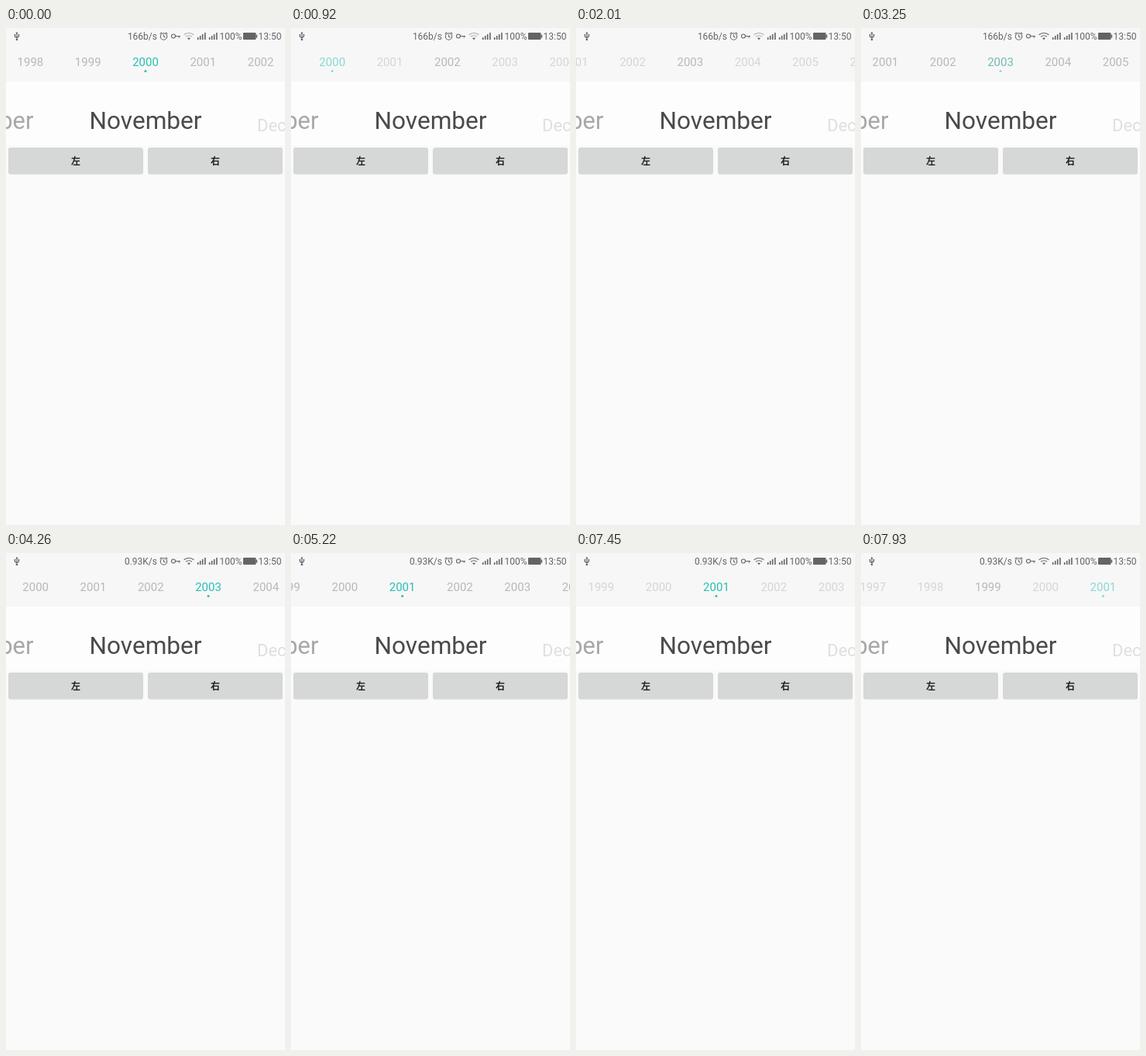
Animation, 360 px wide and 640 px high, one loop 8 s. Source, as an HTML page:

```html
<!DOCTYPE html>
<html lang="en">
<head>
<meta charset="utf-8">
<title>Year picker</title>
<style>
  html, body { margin: 0; width: 100%; height: 100%; overflow: hidden; background: #fafafa; }
  svg { display: block; width: 360px; height: 640px; font-family: Roboto, sans-serif; }
  .status { font-size: 12px; fill: #646466; }
  .icon { fill: none; stroke: #646466; stroke-width: 1.1; }
  .solid { fill: #646466; stroke: none; }
  .year { font-size: 15px; text-anchor: middle; }
  .button { font: 700 12px "Noto Sans CJK SC", "Noto Sans CJK", sans-serif; fill: #222; text-anchor: middle; }
</style>
</head>
<body>
<svg viewBox="0 0 360 640">
  <rect width="360" height="640" fill="#fafafa"/>
  <rect width="360" height="69" fill="#f7f7f8"/>
  <rect y="69" width="360" height="82" fill="#fdfdfd"/>

  <g class="icon">
    <path d="M14 6.5V15M11.5 9v2.2l2.5 1.6 2.5-1.8V9"/>
    <path class="solid" d="M14 4.8l1.6 2.4h-3.2zM12.8 14h2.4v2h-2.4zM10.7 8h1.6v1.7h-1.6zM15.7 8h1.6v1.7h-1.6z"/>
    <circle cx="203.5" cy="11" r="4.2"/>
    <path d="M203.5 8.5V11l2 1.3M198.6 7.6l2.4-2M208.4 7.6l-2.4-2"/>
    <circle cx="216" cy="10.5" r="2.5"/>
    <path d="M218.5 10.5h6.5M223.3 10.5v2.3"/>
    <path id="arcs" d="M229.6 8.8q6.4-4.6 12.8 0M232 11.2q4-2.8 8 0"/>
    <path class="solid" d="M234 13q2-1.2 4 0l-2 2.2z"/>
    <path id="bars" d="M247.7 12v3M250.7 10v5M253.7 8v7M256.9 6v9" stroke-width="1.6"/>
    <use href="#bars" x="15"/>
    <rect class="solid" x="306" y="6" width="16.5" height="9" rx="1"/>
    <rect class="solid" x="322.4" y="8.6" width="1.8" height="4"/>
  </g>
  <g class="status">
    <text id="rate" x="195" y="15" text-anchor="end">166b/s</text>
    <text x="275.5" y="15">100%</text>
    <text x="325.6" y="15">13:50</text>
  </g>

  <g id="strip"></g>

  <text x="35.5" y="130" font-size="31" text-anchor="end" fill="#a8a8a8">October</text>
  <text x="180" y="130" font-size="31.6" text-anchor="middle" fill="#4a4a4c">November</text>
  <text x="324" y="133" font-size="22" fill="#dfdfdf">December</text>

  <g fill="#d6d7d7">
    <rect x="3" y="154" width="174" height="34.5" rx="3"/>
    <rect x="183" y="154" width="174" height="34.5" rx="3"/>
  </g>
  <g class="button">
    <text x="90" y="176">左</text>
    <text x="270" y="176">右</text>
  </g>
</svg>
<script>
  const LOOP = 8000, GAP = 74.3, FIRST = 1995, LAST = 2008;
  const GRAY = [184, 184, 184], TEAL = [40, 190, 176];

  // Time and the year at the centre of the strip
  const path = [
    [0, 2000], [670, 2000], [760, 2000.4], [920, 2001.7], [1150, 2002.95],
    [1500, 2003.65], [2010, 2003.44], [2370, 2003.19],
    [2810, 2003], [3760, 2003], [4260, 2001.91], [4600, 2001.73],
    [5220, 2001.49], [6360, 2001.15], [6940, 2001], [7430, 2001],
    [7690, 2000], [7930, 1999.22], [8000, 1999.08]
  ];

  const slope = i => (path[i + 1][1] - path[i][1]) / (path[i + 1][0] - path[i][0]);
  const tangents = path.map((p, i) => {
    if (i === 0) return 0;
    if (i === path.length - 1) return slope(i - 1);
    const a = slope(i - 1), b = slope(i);
    return a * b > 0 ? 2 * a * b / (a + b) : 0;
  });

  // Monotone cubic through the path
  function centre(t) {
    let i = 0;
    while (i < path.length - 2 && t >= path[i + 1][0]) i++;
    const [t0, a] = path[i], [t1, b] = path[i + 1];
    const h = t1 - t0, u = (t - t0) / h, v = 1 - u;
    return a * v * v * (1 + 2 * u) + b * u * u * (3 - 2 * u)
      + h * u * v * (tangents[i] * v - tangents[i + 1] * u);
  }

  // Years away from the centre are dimmed from touch until the strip is idle
  const dimmed = t => (t >= 690 && t < 2950) || t >= 7450;

  function selection(t) {
    if (t < 3250) return [2000, 1];
    if (t < 4500) return [2003, t < 3370 ? 0.5 : 1];
    return [2001, 1];
  }

  const mix = k => `rgb(${GRAY.map((g, i) => Math.round(g + (TEAL[i] - g) * k))})`;

  const strip = document.getElementById("strip");
  const rate = document.getElementById("rate");
  const arcs = document.getElementById("arcs");

  function add(parent, tag, attrs) {
    const el = document.createElementNS("http://www.w3.org/2000/svg", tag);
    for (const key in attrs) el.setAttribute(key, attrs[key]);
    return parent.appendChild(el);
  }

  const items = [];
  for (let year = FIRST; year <= LAST; year++) {
    const group = add(strip, "g", {});
    const label = add(group, "text", { class: "year", y: 49.4 });
    label.textContent = year;
    const dot = add(group, "circle", { cy: 55.6, r: 1.5, fill: mix(1) });
    items.push({ year, group, label, dot });
  }

  function draw(t) {
    const c = centre(t), dim = dimmed(t), [chosen, amount] = selection(t);
    for (const { year, group, label, dot } of items) {
      const k = year === chosen ? amount : 0;
      group.setAttribute("transform", `translate(${180 + (year - c) * GAP} 0)`);
      group.setAttribute("opacity", dim && Math.abs(year - c) >= 0.5 ? 0.53 : 1);
      label.setAttribute("fill", mix(k));
      dot.setAttribute("opacity", k);
    }
    rate.textContent = t < 4000 ? "166b/s" : "0.93K/s";
    arcs.setAttribute("stroke-opacity", t < 2150 ? 0.5 : 1);
  }

  const start = performance.now();
  function tick() {
    draw((performance.now() - start) % LOOP);
    requestAnimationFrame(tick);
  }
  tick();
</script>
</body>
</html>
```
